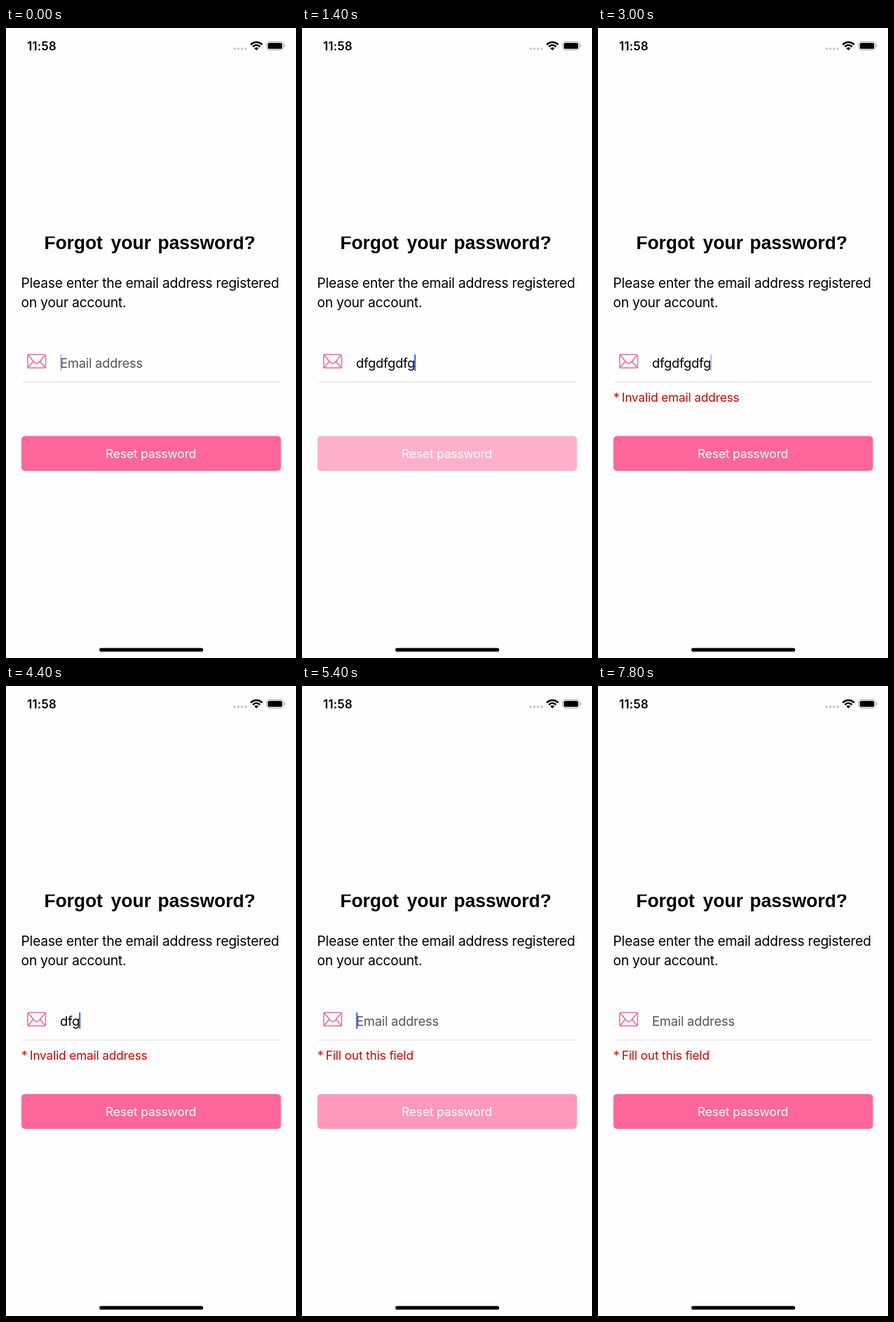
These frames come from a looping animation (480x1040 px, 8000 ms). An HTML page:

```html
<!DOCTYPE html>
<html lang="en">
<head>
<meta charset="utf-8">
<title>Forgot your password</title>
<style>
  html, body { margin: 0; width: 100%; height: 100%; overflow: hidden; background: #fefefe; }
  svg { display: block; width: 480px; height: 1040px; }
  text { font-family: Inter, "Liberation Sans", sans-serif; white-space: pre; }
  .clock { font-size: 19.5px; font-weight: 600; letter-spacing: .3px; }
  .title { font: bold 30.6px "Liberation Sans", Arial, sans-serif; }
  .body { font-size: 22.3px; letter-spacing: -.0105em; }
  .input { font-size: 21.2px; letter-spacing: -.011em; }
  .error { font-size: 19.9px; letter-spacing: -.006em; fill: #dc0000; }
  .label { font-size: 20.2px; letter-spacing: -.008em; fill: #fff; text-anchor: middle; }
  .icon { fill: none; stroke: #f66a9c; stroke-width: 1.8; stroke-linejoin: round; }
  .dots { stroke: #c9c9c9; stroke-width: 4.2; stroke-linecap: round; stroke-dasharray: 0 6; }
  .wifi { fill: none; stroke: #000; stroke-width: 3; }
</style>
</head>
<body>
<svg viewBox="0 0 480 1040">
  <defs>
    <clipPath id="titleClip"><rect y="344.3" width="480" height="40"/></clipPath>
    <clipPath id="wifiClip"><path d="M414.5 37 L402.5 25 V18 H426.5 V25 Z"/></clipPath>
  </defs>

  <text class="clock" x="35" y="36.5">11:58</text>
  <path class="dots" d="M378.5 34.3 H397"/>
  <g clip-path="url(#wifiClip)">
    <circle class="wifi" cx="414.5" cy="36.5" r="13"/>
    <circle class="wifi" cx="414.5" cy="36.5" r="8.2"/>
    <circle cx="414.5" cy="36.5" r="4.6"/>
  </g>
  <rect x="431.5" y="22.5" width="27.5" height="14" rx="4.2" fill="none" stroke="#a6a6a6" stroke-width="1.1"/>
  <rect x="433.4" y="24.4" width="23.7" height="10.2" rx="2.6"/>
  <path d="M460.4 27 Q462.2 27.6 462.2 29.5 T460.4 32 Z" fill="#a6a6a6"/>

  <g clip-path="url(#titleClip)">
    <text class="title" y="365.3"><tspan x="63.2">Forgot</tspan><tspan x="173.8">your</tspan><tspan x="251.3">password?</tspan></text>
  </g>
  <text class="body" x="25" y="428.7">Please enter the email address registered</text>
  <text class="body" x="25" y="460.7">on your account.</text>

  <g class="icon">
    <rect x="35.9" y="539.2" width="29.6" height="22" rx="2"/>
    <path d="M36.7 540.2 L47.3 552.3 Q50.7 556 54.1 552.3 L64.7 540.2 M36.7 560.4 L45.4 550.2 M64.7 560.4 L56 550.2"/>
  </g>
  <text class="input" id="typed" x="89.6" y="560.5"></text>
  <rect id="caret" y="538.8" width="2.5" height="27.4" rx="1.2" fill="#4365d8"/>
  <path d="M28 584.5 H454.5" stroke="#d8d8d8"/>

  <g id="notice">
    <text class="error" x="25.5" y="617.4">*</text>
    <text class="error" id="message" x="39.3" y="617.4"></text>
  </g>

  <g id="button">
    <rect x="25.5" y="673.6" width="429.5" height="57.6" rx="6" fill="#ff669a"/>
    <text class="label" x="239.8" y="710">Reset password</text>
  </g>
  <rect x="154.5" y="1023.4" width="171.8" height="6" rx="3"/>
</svg>
<script>
  const LOOP = 8000, STEP = 200;
  const WORD = "dfgdfgdfg";

  // Milliseconds from the start of the loop.
  const TYPED = 1000, ERASE = 3200, ERASED = 5000;
  const FIRST_TAP = 1308, SECOND_TAP = 5056;
  const HOLD = 200;

  const byId = id => document.getElementById(id);
  const typed = byId("typed"), caret = byId("caret"), notice = byId("notice");
  const message = byId("message"), button = byId("button");

  const clamp = (value, low = 0, high = 1) => Math.min(high, Math.max(low, value));

  // Letters arrive evenly, then go away one per step.
  function letterCount(time) {
    const typing = Math.ceil(WORD.length * time / TYPED);
    const erasing = (ERASED - time) / STEP;
    return clamp(Math.min(typing, erasing), 0, WORD.length);
  }

  // Fades quickly under the finger and returns after release.
  function tapOpacity(age) {
    if (age < 0) return 1;
    const pressed = clamp(age / 150) - clamp((age - HOLD) / 250);
    return 1 - .8 * pressed;
  }

  // Solid during editing and half a second after; otherwise blinks once a second.
  function caretOpacity(time) {
    const within = (from, to) => time >= from && time < to + 500;
    if (within(STEP, TYPED) || within(ERASE, ERASED)) return 1;
    const middle = time < ERASE ? 300 : 350;
    return clamp((340 - Math.abs(time % 1000 - middle)) / 100);
  }

  function errorText(time) {
    if (time >= SECOND_TAP + HOLD) return "Fill out this field";
    return time >= FIRST_TAP + HOLD ? "Invalid email address" : "";
  }

  function render(time) {
    const count = letterCount(time);
    typed.textContent = count ? WORD.slice(0, count) : "Email address";
    typed.setAttribute("fill", count ? "#000" : "#555");
    caret.setAttribute("x", count ? 88.3 + typed.getComputedTextLength() : 89.6);
    caret.setAttribute("opacity", caretOpacity(time));

    const error = errorText(time);
    message.textContent = error;
    notice.setAttribute("visibility", error ? "visible" : "hidden");
    button.setAttribute("opacity", tapOpacity(time - FIRST_TAP) * tapOpacity(time - SECOND_TAP));
  }

  const begin = performance.now();
  function tick() {
    const time = (performance.now() - begin) % LOOP;
    render(Math.floor(time / STEP) * STEP);
    requestAnimationFrame(tick);
  }
  tick();
</script>
</body>
</html>
```
